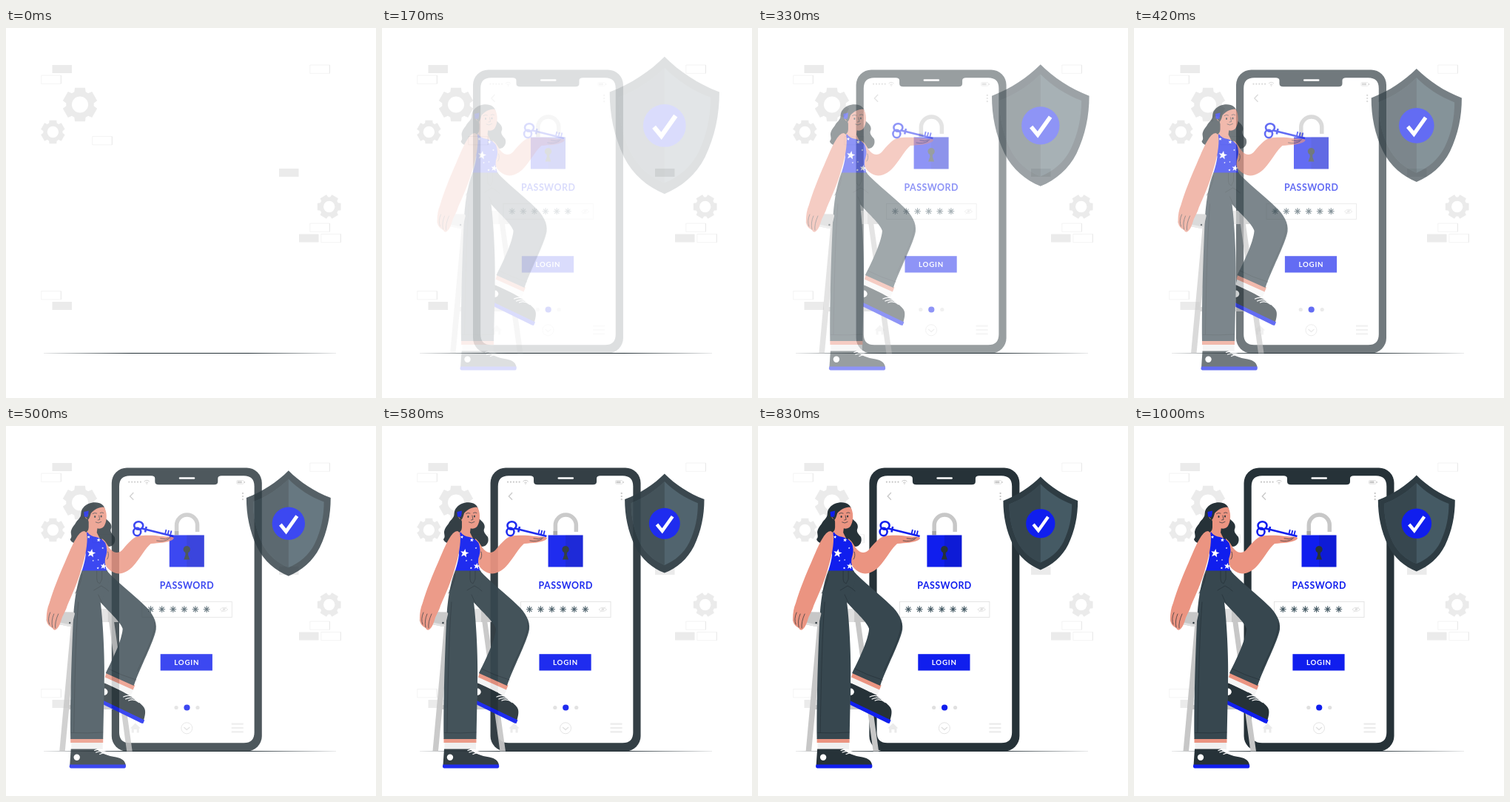
Animation, 500 px wide and 500 px high, one loop 1040 ms. Source, as an HTML page:

```html
<!DOCTYPE html>
<html lang="en">
<head>
<meta charset="utf-8">
<title>Secure login</title>
<style>
  html, body { margin: 0; width: 100%; height: 100%; overflow: hidden; background: #fff; }
  svg { display: block; width: 100%; height: 100%; }
  text { font-family: Lato, "Open Sans", sans-serif; font-weight: 700; text-anchor: middle; }
  .dark { fill: #263238; }
  .pants { fill: #37474f; }
  .blue { fill: #101eee; }
  .skin { fill: #eb9481; }
  .pale { fill: #ebebeb; }
  .grey { fill: #c7c7c7; }
  .white { fill: #fff; }
  .line { fill: none; stroke: #263238; stroke-width: .7; stroke-linecap: round; stroke-linejoin: round; }
  .thin { fill: none; stroke: #e0e0e0; stroke-width: .9; }
  .key { fill: none; stroke: #101eee; stroke-width: 2.6; }
  .lace { fill: none; stroke: #fff; stroke-width: 1.3; stroke-linecap: round; }
</style>
</head>
<body>
<svg viewBox="0 0 500 500">
  <defs>
    <linearGradient id="fade">
      <stop offset="0" stop-color="#263238" stop-opacity=".1"/>
      <stop offset=".3" stop-color="#263238"/>
      <stop offset=".7" stop-color="#263238"/>
      <stop offset="1" stop-color="#263238" stop-opacity=".1"/>
    </linearGradient>
    <path id="crest" d="M0-65C14-51 32-39 52-31.500C52-10 48 10 38.500 30C30 47 16 58.500 0 65C-16 58.500-30 47-38.500 30C-48 10-52-10-52-31.500C-32-39-14-51 0-65Z"/>
    <clipPath id="leftHalf"><rect x="-60" y="-80" width="60" height="160"/></clipPath>
  </defs>

  <g id="backdrop"></g>
  <rect x="51" y="439" width="395" height="1" fill="url(#fade)"/>

  <g id="phone">
    <rect class="dark" x="148.500" y="56.500" width="203" height="383" rx="20.500"/>
    <path class="white" d="M173 67.300H202Q207 67.300 207 71V75Q207 79.300 212 79.300H287Q292 79.300 292 75V71Q292 67.300 297 67.300H327Q341.300 67.300 341.300 81.500V414Q341.300 428.300 327 428.300H173Q158.700 428.300 158.700 414V81.500Q158.700 67.300 173 67.300Z"/>
    <rect class="white" x="239.500" y="69.300" width="21.500" height="2.400" rx="1.200"/>
    <path d="M172 75.700H188" stroke="#c7c7c7" stroke-width="2.200" stroke-linecap="round" stroke-dasharray="0 3.900"/>
    <path d="M192.500 75Q196 71.800 199.500 75M194.300 76.700Q196 75.200 197.700 76.700" fill="none" stroke="#c7c7c7"/>
    <circle class="grey" cx="196" cy="78" r=".8"/>
    <rect class="thin" x="317.500" y="73.500" width="9.500" height="4.800" rx="1"/>
    <path class="grey" d="M318.500 74.500h6v2.800h-6zM327.500 75h1.200v2h-1.200z"/>
    <path d="M178 90L173.300 95L178 99.700" fill="none" stroke="#c7c7c7" stroke-width="1.300"/>
    <path d="M325.700 91V100" stroke="#c7c7c7" stroke-width="2.300" stroke-linecap="round" stroke-dasharray="0 4.100"/>

    <path d="M236.300 147V134A14 14 0 0 1 264.300 134V143" fill="none" stroke="#c7c7c7" stroke-width="5.500"/>
    <path d="M233.500 142H239V147.500H233.500Z" fill="#a6a6a6"/>
    <rect class="blue" x="226.500" y="147.500" width="47" height="43"/>
    <rect x="250" y="147.500" width="23.500" height="43" opacity=".1"/>
    <path class="dark" d="M248 171A4.700 4.700 0 1 1 252 171L251.700 174L254 180.500H246L248.300 174Z"/>
    <text class="blue" x="250.200" y="219.500" font-size="12.400" letter-spacing=".5">PASSWORD</text>

    <rect class="thin" x="189.500" y="237.400" width="121.500" height="21"/>
    <g id="secret" stroke="#455a64" stroke-width="1.100"></g>
    <path class="thin" d="M295 248Q300 242.500 305.500 248Q300 253 295 248ZM296.500 251.500L304 244.500"/>
    <circle cx="300.300" cy="247.800" r="1.800" fill="#e0e0e0"/>

    <rect class="blue" x="214.400" y="308.200" width="70.200" height="22.300"/>
    <text class="white" x="249.900" y="323" font-size="9.700" letter-spacing=".8">LOGIN</text>

    <circle fill="#e0e0e0" cx="235.800" cy="380.500" r="2.600"/>
    <circle class="blue" cx="250.200" cy="380.500" r="4.100"/>
    <circle fill="#e0e0e0" cx="264.700" cy="380.500" r="2.600"/>
    <path class="pale" d="M173.500 408.500L180.500 401.500L187.500 408.500H185.500V414.500H182.500V410H178.500V414.500H175.500V408.500Z"/>
    <circle class="thin" cx="250" cy="408.300" r="7.500"/>
    <path class="thin" d="M246 407L250 410.500L254 407" style="stroke-width:1.400"/>
    <path d="M310.500 402.700H326.500M310.500 408H326.500M310.500 413.300H326.500" stroke="#ebebeb" stroke-width="2.200"/>
  </g>

  <g id="shield">
    <use href="#crest" fill="#2e3c43"/>
    <g transform="scale(.84)">
      <use href="#crest" fill="#455a64"/>
      <use href="#crest" fill="#37474f" clip-path="url(#leftHalf)"/>
    </g>
    <circle class="blue" cy=".3" r="20.300"/>
    <path d="M-10 1.500L-3 10L10.500-9" fill="none" stroke="#fff" stroke-width="4.400"/>
  </g>

  <g id="woman">
    <!-- stool -->
    <path class="grey" d="M83 260H91L74 439.500H66.500ZM133 262H140L165 439.500H157.500ZM74 377H155V383H73Z"/>
    <path d="M86 247H133V265H86Z" fill="#e0e0e0"/>
    <path class="grey" d="M132 247H143Q146 247 146 250V265H132Z"/>

    <!-- hair -->
    <path class="dark" d="M99 110C104 103 118 101 124 106C129 109 129 118 129 125C133 129 138 132 136.500 138C134 143 138 146 141 150C143 156 140 162 134 163C129 163 126 160 124 157L110 150L103 146C103 154 98 158 93 158C88 160 82 157 81 153C84 150 82 147 82 143C83 137 87 134 89 130C92 126 95 124 95.500 120C96 116 96 113 99 110Z"/>

    <!-- bent leg -->
    <path class="dark" d="M126.500 347C132 349 138 351 143 354L161 364C168 369 176 374 180.500 380C184 385 182 392 180 399L126 374Z"/>
    <path class="blue" d="M126 371L179.500 396.500L181.500 397.500L179.500 402Q177 402 174 400L126 376.500Z"/>
    <path class="white" d="M127 354.500A4.200 4.200 0 0 1 127 364Z"/>
    <path d="M129 339L167 355L163 364L127 347Z" fill="#f5f5f5"/>
    <path class="skin" d="M130 333L168.500 350.500L166 356.500L128 339.500Z"/>
    <path class="lace" d="M153 366Q161 362 169 368M156 369Q164 365 172 371M160 371Q167 368 174 373.500"/>
    <path class="pants" d="M107 195H130C143 210 166 227 181 242C192 252 198.500 264 197 275C194 292 175 327 167 351L129 334C137 318 151 290 152 274C149 264 132 250 119 235Z"/>
    <path class="line" d="M132.500 328Q150 337 170 343M195 266C197 282 179 314 172 331"/>

    <!-- standing leg -->
    <path d="M82.500 427H125V438H82.500Z" fill="#f0f0f0"/>
    <path class="skin" d="M81.500 422H125.500V428H81.500Z"/>
    <path class="dark" d="M82 436.500H117C122 442 132 446 143 447.500C151 449 156 453 156 459H80.500Z"/>
    <path class="blue" d="M80.500 457.500H156Q157 462.500 154 462.500H82Q79 462 80.500 457.500Z"/>
    <circle class="white" cx="90" cy="447.800" r="4.200"/>
    <path class="lace" d="M114 438.500Q119 436 127 438.500M116 441Q123 438 130 440.500M121 443.500Q127 440.500 133 442.500"/>
    <path class="pants" d="M97 195H131C136 205 132 220 122 238C126 270 128 320 127 350L125.500 423H81.500C81 370 83 310 85 265C86 237 90 213 97 195Z"/>
    <path class="line" d="M82.500 414.500Q105 415.500 125 414M97 200C96 211 92 218 88 226M117 196V207Q117 212 121 213L124 207V196M113 222L123 216Q129 219 133 223M124 239L119 228M92 238C88 290 87 360 86 414"/>

    <!-- raised arm -->
    <path class="skin" d="M124 152C131 157 132 164 137 168C141 172 147 172 151 168C158 160 164 152 172 149C184 147 195 148 204 149L219 150Q223 151 219 154C212 158 201 158 190 159C183 165 177 176 169 186C162 195 152 201 143 199C135 197 128 190 125 180Z"/>
    <path class="line" d="M198 155Q207 157 214 153M203 152Q210 154 216 151M131 180Q134 176 132 170"/>

    <!-- neck and top -->
    <path class="skin" d="M106 124L118 136L117 144L122 154L103 152L99 146Q106 143 106 137Z"/>
    <path class="blue" d="M104 143Q108 149 116 150Q124 152 128.500 158Q132 167 129.500 175Q126 183 130.500 195.500H97Q101 183 102 174Q98 158 104 143Z"/>
    <g id="stars" class="white"></g>

    <!-- face -->
    <path class="skin" d="M107 114C112 108 122 106 127 110C131 116 131 127 128 133C126 139 120 140 114 137C109 135 106 130 105 126C101 126 100 120 104 119Z"/>
    <path class="dark" d="M102 112C108 104 121 103 126.500 109.500C119 110 113 113 109 118C108 122 107 125 105 127L101 122Z"/>
    <path class="blue" d="M99.500 116L106 114.500L105 123L100 122.500Z"/>
    <ellipse class="dark" cx="114.500" cy="122.500" rx="1" ry="1.500"/>
    <ellipse class="dark" cx="123" cy="122" rx="1" ry="1.500"/>
    <path class="line" d="M111.500 118.500Q114 116.500 117 118M121.500 117.500Q124 116 126 117.500M120 121L121 126.500L118.500 127M115.500 130Q119 132.500 123 129.500M104 121.500Q106 122 106 125"/>

    <!-- lowered arm with handset -->
    <path class="grey" d="M55 251L85 251.500Q88 252 87 255L83.500 269Q83 271.500 80 271L51 265Q48 264 49 261Z"/>
    <path d="M51 262L83.500 269Q83 271.500 80 271L51 265Q48 264 51 262Z" fill="#e0e0e0"/>
    <circle class="dark" cx="80.500" cy="266" r="1.200"/>
    <path class="skin" d="M100 142Q104 143 104 151C104 166 100 181 96 194C91 212 83 229 77 243C75 250 72 254 70 259C68 266 66 272 62 275Q59 277 57 273C52 270 49 267 49 260C49 253 50 246 53 239C58 222 66 202 74 184C81 168 86 154 94 145Q97 142 100 142Z"/>
    <path class="line" d="M54 252Q50 261 53 268M59 254Q55 263 57 272M65 254Q60 265 61 273"/>

    <!-- key -->
    <ellipse class="key" cx="173.500" cy="134.500" rx="6" ry="5.200"/>
    <ellipse class="key" cx="171.500" cy="143" rx="5" ry="5.200"/>
    <path class="key" d="M178 138.500L220.500 149"/>
    <path class="key" d="M184 136L182.300 143.500"/>
    <path class="key" d="M209.500 145.500L210.800 140M213 146.500L214.300 141M216.500 147L217.800 141.500" style="stroke-width:1.800"/>
  </g>
</svg>
<script>
  const $ = id => document.getElementById(id);
  const polar = (r, deg) => {
    const a = deg * Math.PI / 180;
    return (r * Math.cos(a)).toFixed(2) + ' ' + (r * Math.sin(a)).toFixed(2);
  };

  function gear(x, y, r, hole, turn) {
    let d = '';
    for (let a = turn; a < turn + 360; a += 60) {
      const tooth = [[.79, -24], [1, -17], [1, 17], [.79, 24]];
      for (const [k, off] of tooth) d += (d ? 'L' : 'M') + polar(r * k, a + off);
    }
    d += `ZM${-hole} 0a${hole} ${hole} 0 1 0 ${2 * hole} 0a${hole} ${hole} 0 1 0 ${-2 * hole} 0Z`;
    return `<path class="pale" fill-rule="evenodd" transform="translate(${x} ${y})" d="${d}"/>`;
  }

  function star(x, y, r) {
    let d = '';
    for (let i = 0; i < 10; i++) d += (i ? 'L' : 'M') + polar(i % 2 ? r * .42 : r, i * 36 - 80);
    return `<path transform="translate(${x} ${y})" d="${d}Z"/>`;
  }

  function asterisk(x) {
    let d = '';
    for (let a = 0; a < 180; a += 45) d += 'M' + polar(4.4, a) + 'L' + polar(4.4, a + 180);
    return `<path transform="translate(${x} 247.7)" d="${d}"/>`;
  }

  // outlined bar: heavier on the right, fading towards the left
  const outline = (x, y) =>
    `<path transform="translate(${x} ${y})" d="M26.5 0H0V11.300H26.500" fill="#fff" stroke="#ebebeb" stroke-width=".6"/>` +
    `<path transform="translate(${x} ${y})" d="M26.500 0V11.300" stroke="#e6e6e6"/>`;

  const solid = [[62.5, 50], [369, 190], [396, 278.5], [62.5, 370]];
  const hollow = [[47.8, 64], [410.8, 50], [116.8, 146.6], [410.8, 264], [425.8, 278.5], [47.8, 355.6]];
  $('backdrop').innerHTML =
    solid.map(([x, y]) => `<rect class="pale" x="${x}" y="${y}" width="26.5" height="11"/>`).join('') +
    hollow.map(p => outline(...p)).join('') +
    gear(100, 103.5, 23.8, 11, 30) + gear(63.4, 140.5, 16.6, 7.7, 30) + gear(436.7, 241.5, 16.6, 7.7, 0);
  $('secret').innerHTML = [0, 1, 2, 3, 4, 5].map(i => asterisk(201.3 + 15.1 * i)).join('');
  $('stars').innerHTML = [[109.5, 172, 6], [126, 189.5, 4.5], [119.5, 154, 2.8], [106, 150, 2.3],
    [112, 182, 1.3], [118.5, 192, 1.8], [125, 165, 1.5], [119, 181, 1.2]].map(s => star(...s)).join('');

  // cubic-bezier(.36, -.01, .5, 1.38), solved for x by bisection
  function ease(p) {
    const curve = (a, b, s) => 3 * a * s * (1 - s) ** 2 + 3 * b * s * s * (1 - s) + s ** 3;
    let lo = 0, hi = 1;
    for (let i = 0; i < 24; i++) {
      const mid = (lo + hi) / 2;
      if (curve(.36, .5, mid) < p) lo = mid; else hi = mid;
    }
    return curve(-.01, 1.38, lo);
  }

  const LOOP = 1040, FPS = 24;
  const start = performance.now();

  function draw(now) {
    const t = Math.max(0, now - start) % LOOP;
    const step = Math.floor((t - t % 10 + 4) * FPS / 1000);
    const k = step < 2 ? 0 : ease(Math.min(1, step / FPS + .036));
    const rest = 1 - k;
    $('phone').setAttribute('transform', `translate(${-30 * rest} 0)`);
    $('woman').setAttribute('transform', `translate(${30 * rest} 0)`);
    $('shield').setAttribute('transform', `translate(381.8 131.5) scale(${1 + rest / 2})`);
    for (const id of ['phone', 'woman', 'shield'])
      $(id).setAttribute('opacity', Math.min(1, Math.max(0, k)));
    requestAnimationFrame(draw);
  }
  draw(start);
</script>
</body>
</html>
```
